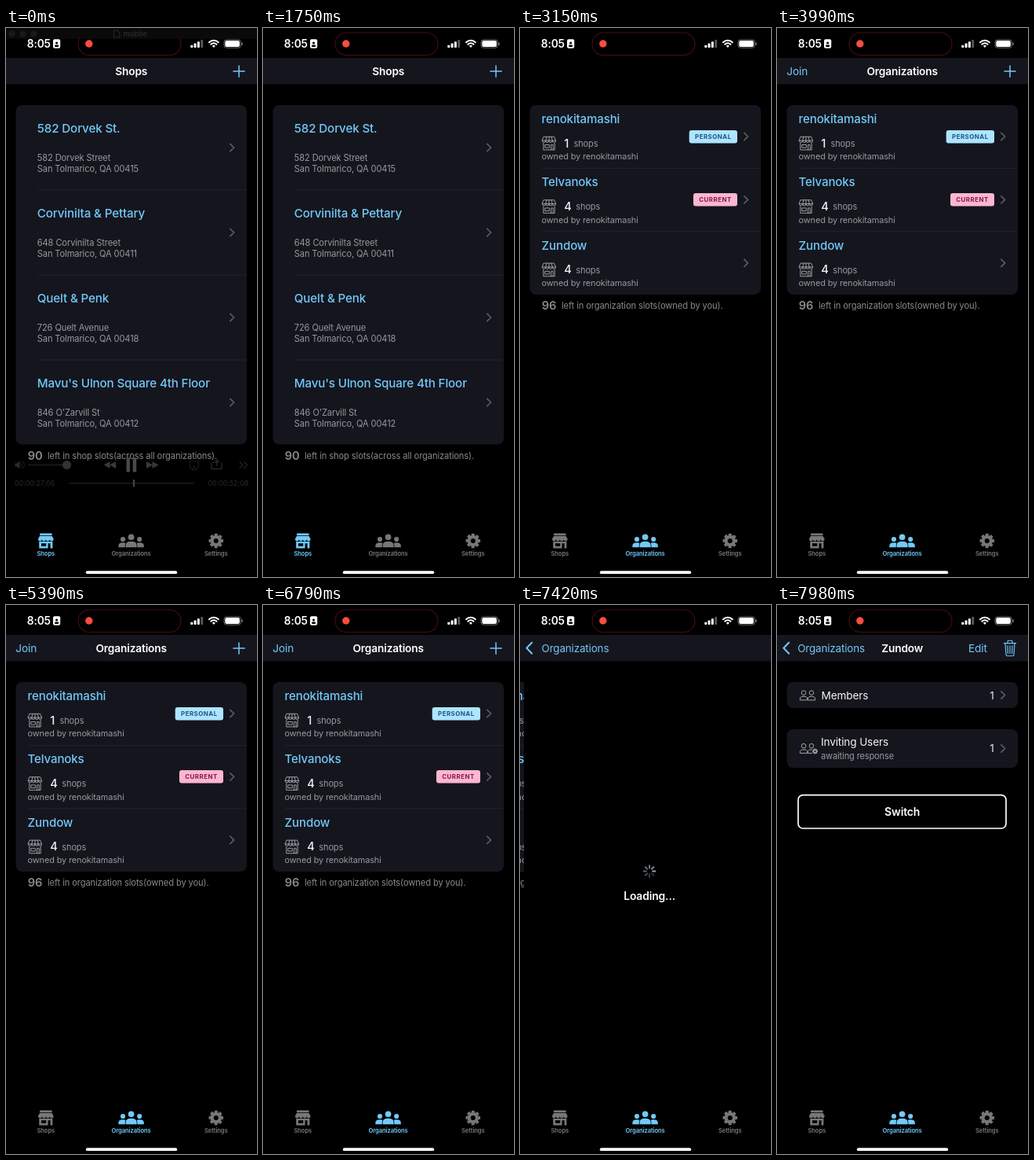
These frames come from a looping animation (320x698 px, 8000 ms). An HTML page:

```html
<!DOCTYPE html>
<html lang="en">
<head>
<meta charset="utf-8">
<title>Shops and organizations</title>
<style>
  html, body { margin: 0; width: 100%; height: 100%; overflow: hidden; background: #000; }
  svg { display: block; width: 100vw; height: 100vh; }
  text { font-family: Inter, Roboto, sans-serif; letter-spacing: -.01em; white-space: pre; }
</style>
</head>
<body>
<svg id="stage" viewBox="0 0 320 698"></svg>
<script>
const LOOP = 8000;
const BLUE = '#72c9fa', BAR = '#15151d', CARD = '#15151d', LINE = '#25252c';
const GREY = '#98989e', DIM = '#8a8a8f', TAB = '#77777b';
const USER = 'renokitamashi';

// Drawing helpers
const text = (x, y, size, fill, str, weight = 400, anchor = 'start', extra = '') =>
  `<text x="${x}" y="${y}" font-size="${size}" fill="${fill}" font-weight="${weight}" text-anchor="${anchor}" ${extra}>${str}</text>`;
const rect = (x, y, w, h, fill, r = 0, extra = '') =>
  `<rect x="${x}" y="${y}" width="${w}" height="${h}" rx="${r}" fill="${fill}" ${extra}/>`;
const circle = (x, y, r, fill, extra = '') => `<circle cx="${x}" cy="${y}" r="${r}" fill="${fill}" ${extra}/>`;
const stroke = (d, color, width = 1, extra = '') =>
  `<path d="${d}" fill="none" stroke="${color}" stroke-width="${width}" stroke-linecap="round" stroke-linejoin="round" ${extra}/>`;
const fillPath = (d, color) => `<path d="${d}" fill="${color}"/>`;
const group = (id, body) => `<g id="${id}">${body}</g>`;
const at = (x, y, body, scale = 1) => `<g transform="translate(${x} ${y}) scale(${scale})">${body}</g>`;

const chevron = y => stroke(`M285.8 ${y - 4.6}l4.8 4.6-4.8 4.6`, '#5b5b61', 1.7);
const divider = (x, y) => rect(x, y, 307 - x, .8, LINE);
const card = (y, h) => rect(12.5, y, 294.5, h, CARD, 8);
const bar = rect(0, 38, 320, 33.5, BAR);
const plus = id => group(id, stroke('M297 48v14.2M289.9 55.1h14.2', BLUE, 1.5));
const heading = (str, id = '') => text(159.7, 59.9, 13.7, '#fff', str, 600, 'middle', id && `id="${id}"`);
const slots = (y, count, str) => text(27.7, y, 14.7, DIM, count, 600) + text(53, y - .6, 11.15, DIM, str);

// Icons, each centred on its own origin
const storeLine = stroke('M-6.6-8.2H6.6L8.6-3.4H-8.6ZM-8.6-3.4a2.15 2.4 0 0 0 4.3 0a2.15 2.4 0 0 0 4.3 0a2.15 2.4 0 0 0 4.3 0a2.15 2.4 0 0 0 4.3 0' +
  'M-3-8.2L-4.3-3.4M0-8.2V-3.4M3-8.2L4.3-3.4M-7.2 0V8.4H7.2V0M-4.8 2H.4V5.6H-4.8ZM2.6 8.4V2H5.2V8.4', '#a3a3a9', .95);
const storeFill = color =>
  rect(-7.8, -9.6, 15.6, 2.8, color, .7) +
  fillPath('M-7.8-6H7.8L9.8-2.4a2.4 2.8 0 0 1-4.9 0a2.4 2.8 0 0 1-4.9 0a2.4 2.8 0 0 1-4.9 0a2.4 2.8 0 0 1-4.9 0Z', color) +
  `<path d="M-8.6 1V9.6H8.6V1ZM-5.8 3.2H.4V6.8H-5.8ZM2.8 3.2H5.8V9.6H2.8Z" fill="${color}" fill-rule="evenodd"/>`;
const person = (x, y, s, color) => at(x, y, circle(0, -4.3, 3.5, color) + fillPath('M-6.4 7.4V5.2Q-6.4.6 0 .6T6.4 5.2V7.4Z', color), s);
const crowd = color => person(-10.6, 1.8, .88, color) + person(10.6, 1.8, .88, color) +
  `<g stroke="#000" stroke-width="1.4" paint-order="stroke">${person(0, 0, 1.1, color)}</g>`;
const gear = (color, s = 1) => at(0, 0,
  circle(0, 0, 5.2, 'none', `stroke="${color}" stroke-width="4.2"`) +
  circle(0, 0, 7.7, 'none', `stroke="${color}" stroke-width="3.2" stroke-dasharray="3.7 2.347" transform="rotate(-104)"`), s);
const memberLine = x => circle(x, -2.9, 2.8, 'none', 'stroke="#a3a3a9"') +
  stroke(`M${x - 4.6} 6V4.6Q${x - 4.6} 1.8 ${x} 1.8T${x + 4.6} 4.6V6Z`, '#a3a3a9');
const pair = memberLine(-5) + memberLine(5);

function shopsPage() {
  const city = 'San Tolmarico, QA 00';
  const shops = [
    ['582 Dorvek St.', '582 Dorvek Street', '415'],
    ['Corvinilta &amp; Pettary', '648 Corvinilta Street', '411'],
    ['Quelt &amp; Penk', '726 Quelt Avenue', '418'],
    ["Mavu's Ulnon Square 4th Floor", "846 O'Zarvill St", '412'],
  ];
  const rows = shops.map(([name, street, zip], i) => {
    const y = 98 + i * 108;
    return text(39.8, y + 35, 15.2, BLUE, name, 500) + text(39.8, y + 71, 11.1, GREY, street) +
      text(39.8, y + 85, 11.1, GREY, city + zip) + chevron(y + 54) + (i ? divider(40, y - .4) : '');
  });
  return bar + heading('Shops') + plus('shopsPlus') + card(98, 431.5) + rows.join('') +
    slots(549, 90, 'left in shop slots(across all organizations).');
}

function orgList() {
  const badge = (x, y, w, label, fill, ink) => rect(x, y, w, 16.5, fill, 3) +
    text(x + w / 2, y + 11.2, 7.9, ink, label, 700, 'middle', 'style="letter-spacing:.06em"');
  const orgs = [
    [USER, 1, badge(215.7, 130, 61.3, 'PERSONAL', '#aee4ff', '#17587f')],
    ['Telvanoks', 4, badge(221, 210, 56, 'CURRENT', '#fbb6d3', '#86184a')],
    ['Zundow', 4, ''],
  ];
  const rows = orgs.map(([name, count, tag], i) => {
    const y = 98 + i * 80.4;
    return text(27.6, y + 22.8, 15.1, BLUE, name, 500) + at(37, y + 48.5, storeLine) +
      text(56.3, y + 53.5, 14.6, '#f2f2f4', count, 500) + text(count > 1 ? 71.3 : 68.5, y + 53, 11, GREY, 'shops') +
      text(27.6, y + 69.3, 10.9, GREY, 'owned by ' + USER) + tag + chevron(y + 40) + (i ? divider(28, y - .4) : '');
  });
  return card(98, 241) + rows.join('') + slots(358, 96, 'left in organization slots(owned by you).');
}

function detailCards() {
  const count = y => text(276.7, y, 13.7, '#e8e8ea', 1, 400, 'end');
  return card(98, 33) + at(39, 114.5, pair) + text(56.5, 119.6, 13.6, '#f4f4f6', 'Members') + count(119.6) + chevron(114.5) +
    card(158, 49) + at(39, 182, pair) + circle(48.5, 186, 4.4, CARD) + at(48.5, 186, gear('#a3a3a9', .38)) +
    text(56, 179.3, 13.6, '#f4f4f6', 'Inviting Users') + text(56, 195.8, 11, GREY, 'awaiting response') + count(187.2) + chevron(182.5) +
    rect(27, 241.7, 265, 42.3, 'none', 6, 'stroke="#fff" stroke-width="1.7"') + text(159.7, 268, 14, '#fff', 'Switch', 600, 'middle');
}

const detailBar = heading('Zundow') + text(244, 60, 13.7, BLUE, 'Edit') +
  stroke('M289.3 48.6h15.4M294 48.4v-2.2q0-1 1-1h4q1 0 1 1v2.2M291 48.8l1 14.4q.1 1.6 1.6 1.6h6.8q1.5 0 1.6-1.6l1-14.4M297 51.8v9.6M294 51.8l.3 9.6M300 51.8l-.3 9.6', BLUE, 1.15);

const spinner = (y, shade) => at(160, y, Array.from({ length: 8 }, (_, i) =>
  `<path class="spoke" data-i="${i}" d="M0-4V-7.4" stroke="${shade}" stroke-width="1.9" stroke-linecap="round" transform="rotate(${i * 45})"/>`).join(''));
const loading = y => spinner(y, '#8fa3b4') + text(160, y + 36.6, 13.9, '#fff', 'Loading...', 600, 'middle');

const status = rect(92, 6, 131, 28.5, '#000', 14.2, 'stroke="#480c13" stroke-width="1.1"') +
  circle(105.8, 20, 4.7, '#fb4c42') + text(26.7, 24.8, 13.8, '#fff', '8:05', 600) +
  rect(60, 14.2, 9.2, 11.6, '#fff', 2) + circle(64.6, 19, 1.6, '#000') + rect(62, 21.4, 5.2, 2.6, '#000', 1.2) +
  [0, 1, 2, 3].map(i => rect(235.3 + i * 4.3, 21.7 - i * 2.2, 3, 3.4 + i * 2.2, i < 3 ? '#fff' : '#55555a', .8)).join('') +
  stroke('M259 18.2a8.2 8.2 0 0 1 11.8 0M261.3 20.8a5 5 0 0 1 7.2 0', '#fff', 2) + fillPath('M262.9 22.7a2.9 2.9 0 0 1 4 0l-2 2.2Z', '#fff') +
  rect(278, 14.9, 21.4, 10.3, 'none', 3.2, 'stroke="#77777b" stroke-width=".9"') + rect(279.3, 16.1, 18.6, 7.9, '#fff', 2.1) +
  rect(300.4, 18.3, 1.3, 3.6, '#88888c', .6);

const tabs = active => [['Shops', 50.8, storeFill], ['Organizations', 159.6, crowd], ['Settings', 267.8, gear]]
  .map(([label, x, icon], i) => {
    const color = i === active ? BLUE : TAB;
    return at(x, 652, icon(color)) + text(x, 671.3, 7.6, color, label, 600, 'middle');
  }).join('');

// Media player controls left over on top of the screen
const skip = (x, dir) => [0, 7.5].map(d => x + d * dir)
  .map(a => fillPath(`M${a} 551L${a + 8 * dir} 555.5L${a} 560Z`, '#3a3a3a')).join('');
const player = rect(0, 0, 320, 14, '#0b0b0c') + [7.5, 21.5, 35.5].map(x => circle(x, 7.5, 4.3, '#1a1a1b')).join('') +
  stroke('M138 3h4l3 3v6h-7Z', '#2a2a2c') + text(149.5, 10.6, 9.5, '#2a2a2c', 'mobile', 600) +
  fillPath('M11.5 553.5h2.5l3.5-3v10l-3.5-3h-2.5Z', '#2c2c2c') + stroke('M19.5 553a4 4 0 0 1 0 5M21.8 551.2a7 7 0 0 1 0 8.6', '#262626') +
  rect(28, 555, 50, 1.2, '#242424') + circle(77.5, 555.5, 5.5, '#333') +
  skip(140, -1) + skip(179, 1) + rect(153.5, 546, 4.5, 18.5, '#4a4a4a', 1) + rect(161.7, 546, 4.5, 18.5, '#4a4a4a', 1) +
  stroke('M236 559h-1.5v-8h11v8h-1.5M240 557l3.5 4.5h-7Z', '#1c1c1c', 1.2) +
  stroke('M262 553v7.5h13V553M264 552h6M268.5 556.5v-7.5l3 2.5', '#282828', 1.4) + stroke('M298 551.5l4 4-4 4M303.5 551.5l4 4-4 4', '#242424', 1.2) +
  text(11, 582, 9, '#2b2b2b', '00:00:27;06') + text(257.5, 582, 9, '#2b2b2b', '00:00:52;08') +
  rect(80, 578.3, 160, 1.2, '#222') + rect(161.8, 574, 2.4, 9.5, '#444', 1);

document.getElementById('stage').innerHTML =
  rect(0, 0, 320, 698, '#000') +
  group('shops', shopsPage()) +
  group('firstLoad', rect(0, 38, 320, 592, '#000') + group('headerGlow', rect(0, 38, 320, 59, '#1c1c28')) + loading(323.8)) +
  group('orgs', orgList()) +
  group('detail', rect(0, 71, 320, 559, '#000') + group('wait', loading(338.5)) + group('cards', detailCards())) +
  group('orgBar', bar + group('join', text(12.3, 60, 13.7, BLUE, 'Join')) + plus('orgPlus') + heading('Organizations', 'titleOut') +
    text(160, 60, 13.4, BLUE, 'Organizations', 400, 'middle', 'id="titleIn"') + group('back', stroke('M15.2 47.8L8.4 54.8l6.8 7', BLUE, 2))) +
  group('detailBar', detailBar) +
  status + group('tabsShops', tabs(0)) + group('tabsOrgs', tabs(1)) +
  rect(101.8, 690.2, 116.4, 3.9, '#fff', 2) + group('player', player);

const nodes = Object.fromEntries([...document.querySelectorAll('[id]')].map(n => [n.id, n]));
const spokes = [...document.querySelectorAll('.spoke')];
const clamp = v => Math.min(1, Math.max(0, v));
const fade = (id, v) => nodes[id].setAttribute('opacity', v);
const show = (id, on) => nodes[id].setAttribute('display', on ? 'inline' : 'none');
const move = (id, x) => nodes[id].setAttribute('transform', `translate(${x} 0)`);

const TIME = { player: 280, tab: 2800, tabEnd: 3010, list: 3150, listBar: 3220, push: 7000, cards: 7700 };

// Critically damped spring from 0 to 1
const spring = ms => { const x = Math.max(0, ms) * .0145; return 1 - (1 + x) * Math.exp(-x); };

function draw(t) {
  fade('player', clamp(1 - t / TIME.player));

  const onOrgs = t >= TIME.tab;
  show('tabsShops', !onOrgs);
  show('tabsOrgs', onOrgs);
  const swap = clamp((t - TIME.tab) / (TIME.tabEnd - TIME.tab));
  show('shops', swap < 1);
  nodes.shops.setAttribute('transform', `translate(160 340) scale(${1 - .006 * swap}) translate(-160 -340)`);
  show('firstLoad', onOrgs && t < TIME.list);
  fade('firstLoad', swap);
  fade('headerGlow', 1 - swap);

  const p = spring(t - TIME.push);
  show('orgs', t >= TIME.list);
  show('orgBar', t >= TIME.listBar);
  show('detail', t >= TIME.push);
  move('orgs', -96 * p);
  move('detail', 320 * (1 - p));
  for (const id of ['titleOut', 'titleIn']) move(id, -91 * p);
  for (const id of ['join', 'orgPlus', 'titleOut']) fade(id, 1 - p);
  fade('titleIn', p);
  fade('back', clamp(p * 1.2));

  const loaded = t >= TIME.cards;
  show('wait', !loaded);
  show('cards', loaded);
  show('detailBar', loaded);

  const head = Math.floor(t / 100) % 8;
  for (const s of spokes) s.setAttribute('opacity', 1 - .1 * ((head - s.dataset.i + 8) % 8));
}

const start = performance.now();
function tick() {
  draw((performance.now() - start) % LOOP);
  requestAnimationFrame(tick);
}
draw(0);
requestAnimationFrame(tick);
</script>
</body>
</html>
```
